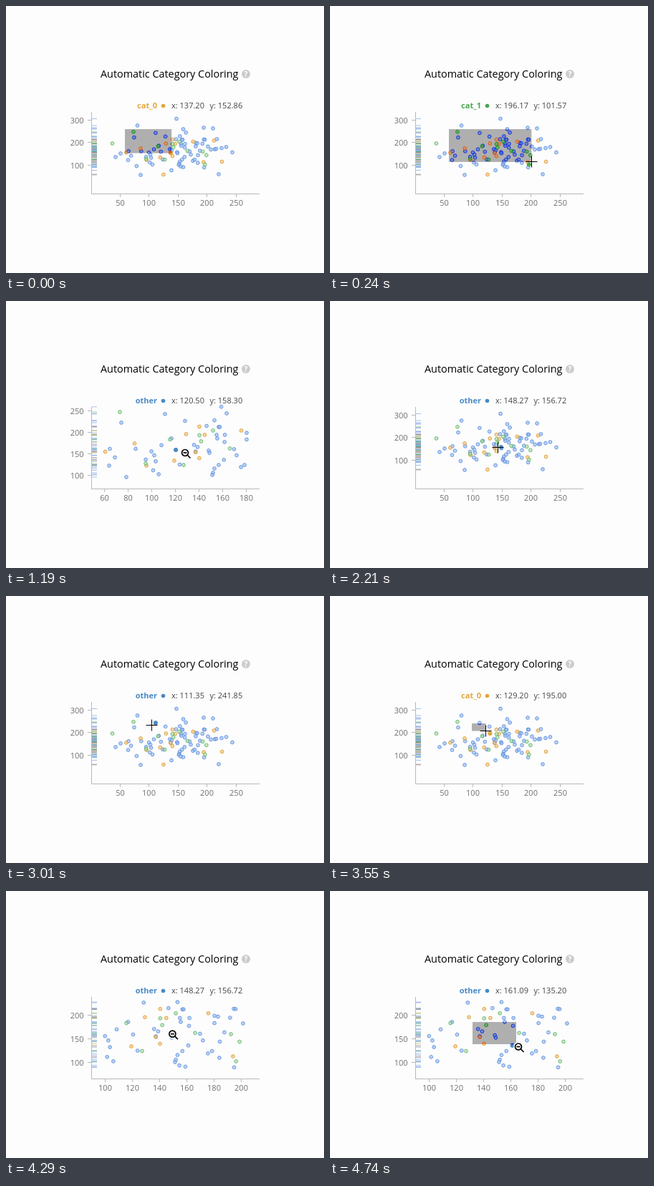
Recreate the animation shown at these times as an HTML page. Size 444 px wide and 373 px high, loop 4.84 s.

```html
<!DOCTYPE html>
<html lang="en">
<head>
<meta charset="utf-8">
<title>Automatic Category Coloring</title>
<style>
html, body { margin: 0; width: 100%; height: 100%; overflow: hidden; background: #fdfdfd; }
svg { display: block; width: 444px; height: 373px; font: 11px "Open Sans", sans-serif; }
.tick { fill: #6e6e6e; }
.tip { fill: #444; }
.axis { stroke: #b8b8b8; fill: none; }
</style>
</head>
<body>
<svg viewBox="0 0 444 373">
  <text x="132" y="100" font-size="14.4">Automatic Category Coloring</text>
  <circle cx="335" cy="95" r="6" fill="#ccc"/>
  <text x="335" y="98.7" font-size="10" font-weight="700" fill="#fff" text-anchor="middle">?</text>
  <g id="plot"></g>
</svg>
<script>
const LOOP = 4840;

// Flat x, y pairs per category.
const cats = {
  other: {
    ink: '#4a8ac6', line: '#5f8edb', fill: '#8db8f2', hot: '#0a1ee0', hotFill: '#3f78d8',
    data: [74.5,221.7, 111.35,241.85, 128.3,225.8, 86.6,160.8, 64.8,160.8, 69.1,140.8, 64.2,121.7,
      78.7,95, 95.1,135.8, 99.9,155, 102.3,145.8, 103.5,131.7, 101.4,110.8, 106,101.7, 108.4,169.2,
      116.8,185, 120.5,158.3, 123.8,124.2, 153.1,227, 163.4,243.3, 146.5,214.2, 156.7,211.7,
      157.6,211.7, 154.9,193.3, 155.5,185, 161.9,193.3, 161.6,176.7, 135.9,170, 138.9,165,
      137.16,154.57, 148.27,156.72, 148.9,151.7, 169.7,160, 171.8,145.8, 161.09,135.2, 156.7,123.3,
      153.1,115, 151.9,105, 151.3,100, 175.5,118.3, 178.5,123.3, 180.3,198, 180.3,182.5,
      182.9,196.2, 191.8,193.9, 194.5,212.9, 195.8,212.1, 201.3,181.8, 187.6,162.9, 184.2,143.2,
      183.9,109.1, 154.5,92.9, 158.9,90.2, 80.1,274.6, 42.6,134.9, 51.2,150.8, 85.7,55.6,
      138.6,76.2, 147.2,304.8, 158.9,258.7, 194,265, 210,261.9, 216.7,214.3, 224.7,174.6,
      232.7,179.4, 243.2,155.6, 213,169.8, 215.5,171.4, 206.3,168.3, 219.8,58.7, 194.8,88.9]
  },
  cat_0: {
    ink: '#e2a63c', line: '#dc9a34', fill: '#f2bd68', hot: '#f0500a', hotFill: '#e08a28',
    data: [129.2,195, 85.7,173.3, 60.9,154.2, 95.7,121.7, 119.2,133.3, 140.4,212.5, 144.9,193.3,
      137.2,152.86, 140.28,139.01, 175.8,203.3, 193.9,112.1, 125,57.1, 211.8,207.9, 225.4,114.3]
  },
  cat_1: {
    ink: '#4aa651', line: '#5cb464', fill: '#a3d8a2', hot: '#0a8a14', hotFill: '#4aa83e',
    data: [73.3,246.7, 95.1,126.7, 115.6,182.5, 127.1,123.3, 151.9,203.3, 140.4,192.5, 141.9,178.3,
      166.1,161.7, 192.4,159.1, 198.7,143.2, 196.17,101.57, 37,195.2]
  }
};
const points = Object.entries(cats).flatMap(([name, cat]) =>
  cat.data.flatMap((x, i, d) => i % 2 ? [] : [{ name, cat, x, y: d[i + 1] }]));

const makeView = (x0, kx, y0, ky, xTicks, yTicks) =>
  ({ px: v => x0 + kx * v, py: v => y0 - ky * v, xTicks, yTicks });
const wide = makeView(118.4, .8125, 253.5, .315, [50, 100, 150, 200, 250], [100, 200, 300]);
const zoomA = makeView(37.8, 1.654, 303, .6, [60, 80, 100, 120, 140, 160, 180], [100, 150, 200, 250]);
const zoomB = makeView(-51.5, 1.9, 305, .66, [100, 120, 140, 160, 180, 200], [100, 150, 200]);

// Pointer keys: time, x, y.
const path = [
  [0, 231, 205.5], [50, 238, 208], [350, 306, 223.5], [759, 306, 223.5],
  [760, 264, 219.5], [900, 247, 208.5], [1270, 247, 208.5], [1550, 236, 204.5],
  [2210, 235, 204.5], [2630, 207, 181], [3000, 207, 181], [3010, 204, 181],
  [3210, 198, 178], [3450, 198, 178], [3900, 285, 224.8], [3949, 285, 224.8],
  [3950, 282, 219], [4010, 280, 218], [4460, 199, 183], [4550, 199, 183],
  [4740, 260, 214], [LOOP, 260, 214]
];
// Brush drags: start, end, corner x, y.
const drags = [[0, 350, 166, 172], [3450, 3950, 198, 178], [4550, LOOP, 199, 183]];

function pointer(t) {
  const i = path.findIndex(k => k[0] > t);
  const [a, x, y] = path[i - 1], [b, u, v] = path[i];
  const p = (t - a) / (b - a);
  return [x + (u - x) * p, y + (v - y) * p];
}

const viewAt = t => t >= 3950 ? zoomB : t >= 350 && t < 1270 ? zoomA : wide;

function axes(v) {
  const snap = n => Math.round(n - .5) + .5;
  let d = 'M119.5 148V262.5M119 262.5H354', labels = '';
  for (const n of v.xTicks) {
    const x = snap(v.px(n));
    d += `M${x} 262v5`;
    labels += `<text class="tick" x="${x}" y="279" text-anchor="middle">${n}</text>`;
  }
  for (const n of v.yTicks) {
    const y = snap(v.py(n));
    d += `M119 ${y}h-5`;
    labels += `<text class="tick" x="108.5" y="${y + 4}" text-anchor="end">${n}</text>`;
  }
  return `<path class="axis" d="${d}"/>` + labels;
}

const dots = (list, line, fill) => list.map(p =>
  `<circle cx="${p.sx}" cy="${p.sy}" r="2.4" fill="${p.cat[fill]}" fill-opacity=".6" stroke="${p.cat[line]}" stroke-opacity=".85"/>`).join('');

function tooltip(p) {
  return `<g class="tip"><text x="211" y="143" text-anchor="end" font-weight="700" style="fill:${p.cat.ink}">${p.name}</text>
    <circle cx="219.5" cy="139.5" r="2.8" fill="${p.cat.ink}"/>
    <text x="231" y="143">x: ${p.x.toFixed(2)}</text><text x="284.5" y="143">y: ${p.y.toFixed(2)}</text></g>`;
}

function cursor(x, y, zoomed) {
  if (!zoomed) {
    return `<path transform="translate(${Math.floor(x) + .5} ${Math.floor(y) + .5})" d="M-8 0H8M0-8V8" stroke="#000"/>`;
  }
  const lens = '<circle r="4.5"/><path d="M3.5 3.5L7.5 7.5"/>';
  return `<g transform="translate(${x + 3} ${y + 3.5})" fill="#fff">
    <g stroke="#fff" stroke-width="4.5" stroke-linecap="round">${lens}</g>
    <g stroke="#000" stroke-width="1.7">${lens}<path d="M-2.5 0h5"/></g></g>`;
}

function draw(t) {
  const v = viewAt(t), [mx, my] = pointer(t);
  const shown = points.map(p => ({ ...p, sx: v.px(p.x), sy: v.py(p.y) }))
    .filter(p => p.sx > 134 && p.sx < 338 && p.sy > 146 && p.sy < 247);
  const gap = p => Math.hypot(p.sx - mx, p.sy - my);
  const near = shown.reduce((a, b) => gap(b) < gap(a) ? b : a);

  let out = axes(v);
  out += shown.map(p => `<path d="M120 ${p.sy}h7" stroke="${p.cat.line}" stroke-opacity=".55"/>`).join('');
  out += dots(shown, 'line', 'fill');
  out += `<circle cx="${near.sx}" cy="${near.sy}" r="3" fill="${near.cat.ink}"/>`;

  const drag = drags.find(([a, b]) => t >= a && t < b);
  if (drag) {
    const [, , x, y] = drag;
    const box = `<rect x="${x}" y="${y}" width="${Math.max(0, mx - x)}" height="${Math.max(0, my - y)}" fill="#afafaf"/>`;
    out += `<clipPath id="brush">${box}</clipPath>${box}<g clip-path="url(#brush)">${dots(shown, 'hot', 'hotFill')}
      <circle cx="${near.sx}" cy="${near.sy}" r="3" fill="${near.cat.hot}"/></g>`;
  }
  out += tooltip(near);
  if (t >= 50) out += cursor(mx, my, v !== wide);
  plot.innerHTML = out;
}

const plot = document.getElementById('plot');
const start = performance.now();
function tick() {
  draw((performance.now() - start) % LOOP);
  requestAnimationFrame(tick);
}
tick();
</script>
</body>
</html>
```
